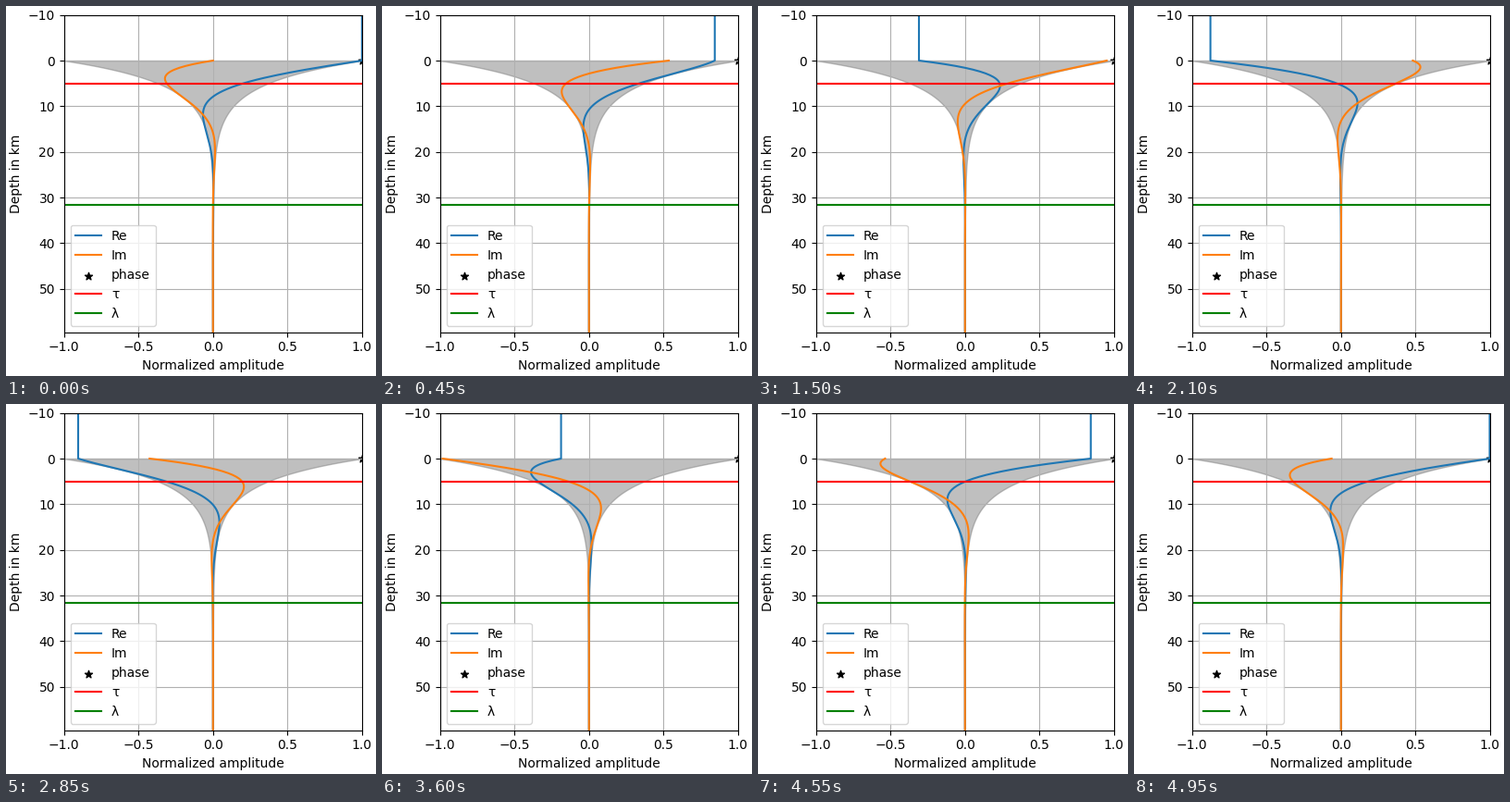
A matplotlib script that plays this animation: 400 by 400 pixels, repeating every 5000 ms.

```python
import numpy as np
import matplotlib.pyplot as plt
from matplotlib.animation import FuncAnimation

FRAMES = 100
INTERVAL = 50                       # ms
RESISTIVITY, PERIOD = 100.0, 1.0    # ohm m, s
TOP, BOTTOM = -10, 59.5             # depth range in km

skin_depth = 0.5033 * np.sqrt(RESISTIVITY * PERIOD)
wavelength = 2 * np.pi * skin_depth

depth = np.linspace(0, BOTTOM, 300)
envelope = np.exp(-depth / skin_depth)
depth_with_air = np.concatenate(([TOP], depth))


def field(frame):
    """Complex amplitude of the damped wave below the surface."""
    angle = 2 * np.pi * frame / FRAMES
    return envelope * np.exp(1j * (angle - depth / skin_depth))


def with_air(values):
    """Extend the surface value unchanged up through the air."""
    return np.concatenate((values[:1], values))


fig, ax = plt.subplots(figsize=(4, 4), dpi=100, layout="constrained")
ax.fill_betweenx(depth, -envelope, envelope, color="gray", alpha=0.5)

start = field(0)
re_line, = ax.plot(with_air(start.real), depth_with_air, label="Re")
im_line, = ax.plot(start.imag, depth, label="Im")
ax.scatter(1, 0, marker="*", color="black", label="phase")
ax.axhline(skin_depth, color="red", label="τ")
ax.axhline(wavelength, color="green", label="λ")

ax.set_xlim(-1, 1)
ax.set_ylim(BOTTOM, TOP)
ax.set_xlabel("Normalized amplitude")
ax.set_ylabel("Depth in km")
ax.grid(True)
ax.legend(loc="lower left")

# Settle the layout once so the axes stay fixed during the animation.
fig.draw_without_rendering()
fig.set_layout_engine("none")


def update(frame):
    wave = field(frame)
    re_line.set_xdata(with_air(wave.real))
    im_line.set_xdata(wave.imag)
    return re_line, im_line


anim = FuncAnimation(fig, update, frames=FRAMES, interval=INTERVAL,
                     repeat=True, repeat_delay=0)
plt.show()
```
